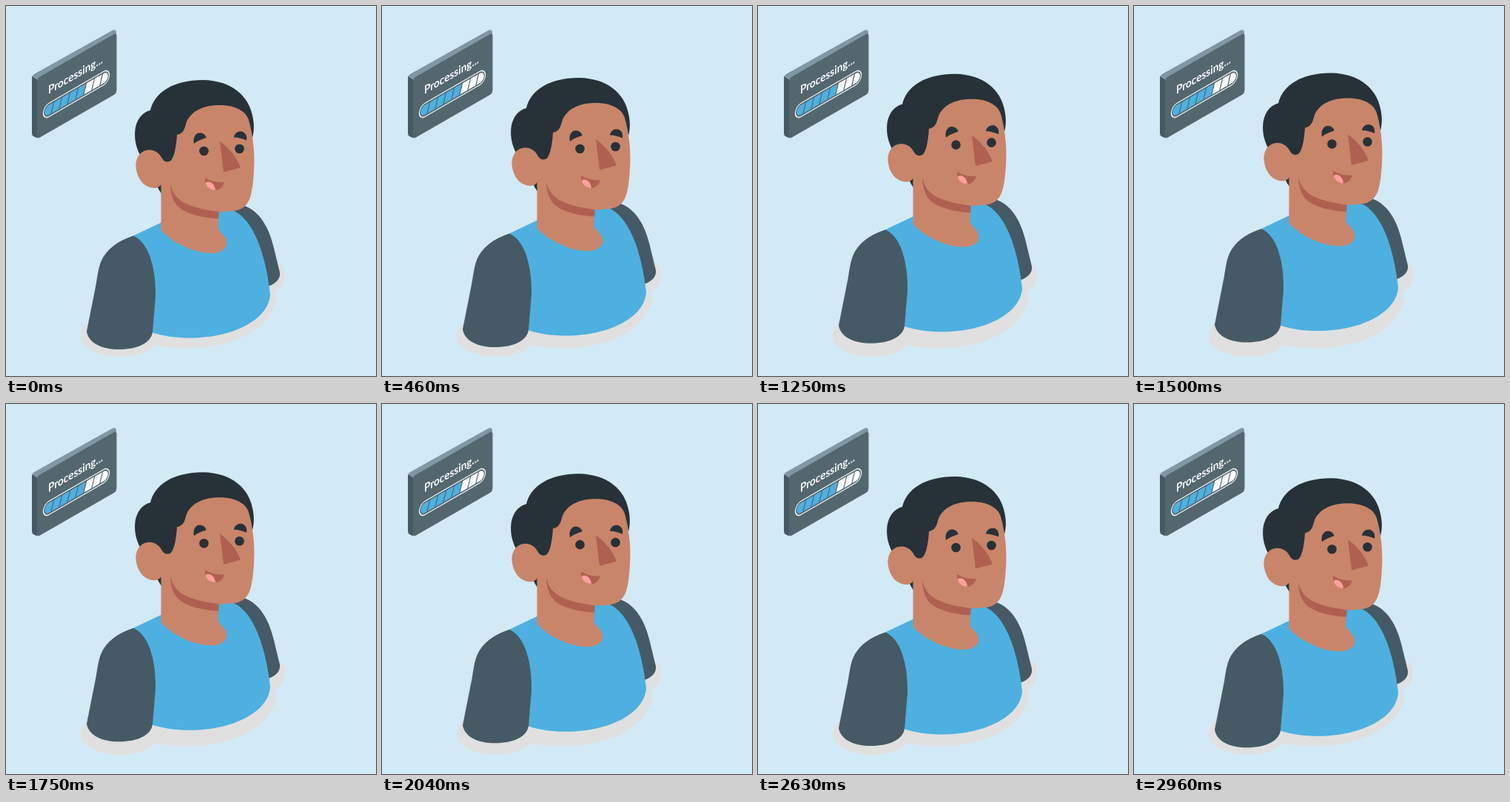
An HTML page that plays this animation: 500 px wide and 500 px high, repeating every 3000 ms.

```html
<!DOCTYPE html>
<html lang="en">
<head>
<meta charset="utf-8">
<title>Processing</title>
<style>
  html, body { margin: 0; width: 100%; height: 100%; overflow: hidden; background: #d2eaf6; }
  svg { display: block; width: 100%; height: 100%; }
  text { font: 700 15.6px Lato, sans-serif; fill: #fff; }
  .skin { fill: #c98569; }
  .shade { fill: #b06050; }
  .hair { fill: #263238; }
  .sleeve { fill: #455a64; }
  .blue { fill: #4db0e0; }
</style>
</head>
<body>
<svg viewBox="0 0 500 500">
  <defs>
    <clipPath id="pill"><rect x="2.6" y="2.3" width="98.8" height="13.4" rx="6.7"/></clipPath>
  </defs>

  <!-- panel -->
  <path fill="#7e98a4" d="M35 97Q35 94 38 92L144 32.800Q147 31.500 149 34L149 42L42 101L35 98Z"/>
  <path fill="#455a64" d="M35 95L42 99.500V178.500L37 176Q35 175 35 172Z"/>
  <path fill="#53676f" d="M42 102Q42 98 45 96L146 38Q149.500 36.500 149.500 40.500V113Q149.500 118 146 120L46 177.500Q42 180 42 176Z"/>
  <text transform="matrix(.866 -.5 0 1 57 119.500)">Processing...</text>
  <g transform="matrix(.866 -.5 0 1 50 136)">
    <rect x=".5" y="-.1" width="103" height="18.200" rx="9.100" fill="none" stroke="#fff" stroke-width="1.300"/>
    <g id="bar" clip-path="url(#pill)"></g>
  </g>

  <path fill="#e0e0e0" d="M109 429C99 437 97 454 111 463C123 471 139 474 154 474C176 474 191 469 202 458.500C220 462 238 463 256 462C306 460 346 440 360 412C365 403 366 394 363 387C373 382 378 371 377 360C376 353 373 349 369 347Z"/>

  <g id="person">
    <path class="sleeve" d="M300 276L322 270C342 277 355 298 361.500 325L370 360C371 368 366 374.500 355 378.500L330 350Z"/>
    <path class="blue" d="M172 310.500L210 292.500L288 277L306 276C334 287 351 335 357 390C355 423 308 448.500 249 448.500C229 448.500 212 446 197 441Z"/>
    <path class="sleeve" d="M172 310.500C150 317.500 135 330 128.500 345C124.500 355 123.500 366 121.500 377L109 440C112 456 130 464 153 464C178 464 196 455 198 441L202 393C203 355 193 319 172 310.500Z"/>

    <path class="hair" d="M203 240Q206 249 211 254.500V236Z"/>
    <path class="skin" d="M209.500 230V303C226 321 255 334 279 334C296 333 302 323 296 313C292 306 286 304 286.500 298L288 270Z"/>
    <path class="shade" d="M222 239C226 262 243 272 288 278L287 287.500C260 286 238 279 230 268C224 260 222 249 222 239Z"/>
    <path class="hair" d="M184 206C176 194 173 180 174.500 167C177 151 186 143 195 141C201 116 227 100 266 100C305 100.500 328 122 333 148C336 161 335 171 333 178L300 200H215Z"/>
    <path class="skin" d="M231 174C238 173 241 168 243 160C247 145 263 134.500 286 134C308 133.500 324 141 328 154C333 172 335.500 190 335.500 211C334.500 241 332 261 324.500 268.500C318 277.500 304 278 288 278C243 272 226 262 222 239L209.500 235V205Z"/>
    <path class="hair" d="M195 170L231 174C230 191 227 210 219 211C212 212 210 205 207 201L198 196Z"/>
    <path class="skin" d="M211 206C207 198 200 194 193 194.500C181 195 175 206 175.500 217C177 234 187 246 201 246Q206 246 211 240L225 239V208Q216 214 211 206Z"/>

    <circle class="hair" cx="267.500" cy="196" r="6.300"/>
    <circle class="hair" cx="315.500" cy="193" r="6.300"/>
    <path class="hair" d="M254 186C252 177 257 170.500 263 171.500C268 172 270.500 176 270.500 178C265 180 259 182 254 186Z"/>
    <path class="hair" d="M308 177.500C309 171 315 168.500 320 170C324.500 172 326 177 325 181.500C320 179.500 314 177.500 308 177.500Z"/>
    <path class="shade" d="M289 183C302 192 312 205 317 218.500L294 224.500Z"/>
    <path class="shade" d="M269 232C277 237 286 239 295 238C293 246 287 249 282 249C274 247 268 241 269 232Z"/>
    <path fill="#ffa09f" d="M269.800 239C274 235 282 239 283 248.800C277 249 271 245 269.800 239Z"/>
  </g>
</svg>
<script>
  const LOOP = 3000, STEPS = 72, RISE = 10;
  const person = document.getElementById('person');

  // eight slanted cells, the first five filled
  const pitch = 12.7;
  document.getElementById('bar').innerHTML = Array.from({ length: 8 }, (_, i) => {
    const left = i ? 2.8 + i * pitch : -4, right = i < 7 ? 1.2 + (i + 1) * pitch : 110;
    return `<path fill="${i < 5 ? '#4db0e0' : '#fff'}" d="M${left + 2.8} 0H${right + 2.8}L${right - 2.8} 18H${left - 2.8}Z"/>`;
  }).join('');

  // linear float up and down, held on 24 steps per second
  function draw(now) {
    const step = Math.floor((now % LOOP + 3.4) * STEPS / LOOP);
    const phase = (step + 1) % STEPS / STEPS;
    const lift = RISE * (1 - Math.abs(1 - 2 * phase));
    person.setAttribute('transform', `translate(0 ${(0.28 - lift).toFixed(3)})`);
  }

  const start = performance.now();
  (function tick() {
    draw(performance.now() - start);
    requestAnimationFrame(tick);
  })();
</script>
</body>
</html>
```
